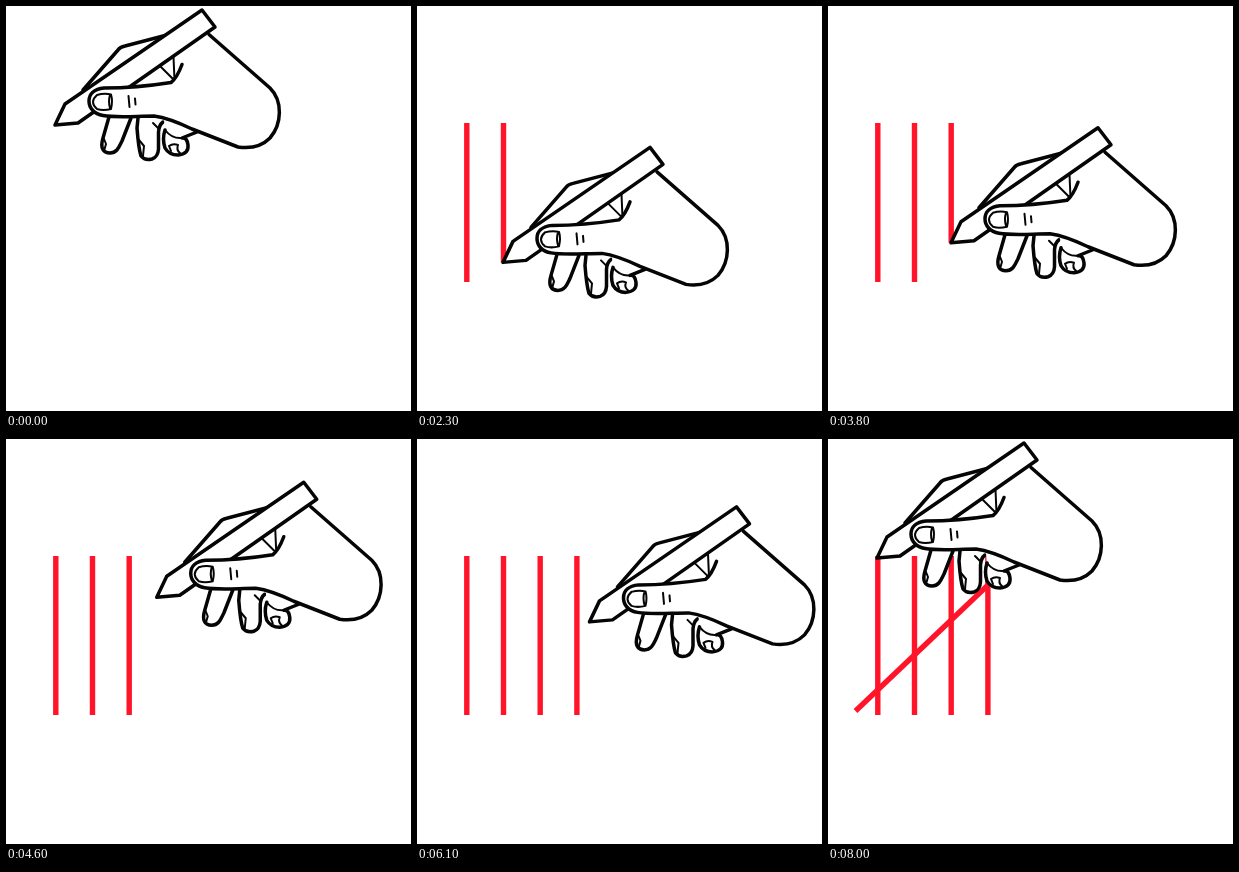
These frames come from a looping animation (405 px wide and 405 px high, 8.2 s). An HTML page:

```html
<!DOCTYPE html>
<html lang="en">
<head>
<meta charset="utf-8">
<title>Tally marks</title>
<style>
  html, body { margin: 0; height: 100%; overflow: hidden; background: #fff; }
  svg { display: block; width: 100%; height: 100%; }
  #marks { stroke: #ff1429; stroke-width: 5.4; }
  #hand { fill: #fff; stroke: #050505; stroke-width: 3.5; stroke-linejoin: round; stroke-linecap: round; }
  #hand .thin { fill: none; stroke-width: 2; }
  #hand .skin { stroke: none; }
</style>
</head>
<body>
<svg viewBox="0 0 405 405">
  <g id="marks"></g>
  <g id="hand">
    <!-- curled fingers -->
    <path d="M103 111L97 132C94 142 97 147 104 147C111 147 113 141 116 135L125 112"/>
    <path d="M132 112L131 122C132 135 133 144 135 150Q139 155 146 153Q152 151 152.500 143L152.500 126Q153 119 157 116"/>
    <path class="skin" d="M158 112L159 128L177 134L192 125L186 116Z"/>
    <path d="M159 124C157 130 157 136 159 142Q163 149 172 149Q183 148 182 139Q181 131 176 132L191 126"/>
    <path class="thin" d="M98 133L100 138L98 145M133 134L138 140L137 150M147 117L152 122M163 140Q167 137 172 139Q170 144 174 147M163 140L165 145M159 124Q166 133 176 132"/>
    <!-- index finger and the gap under the pen -->
    <path d="M77 84L112 44Q114 41 119 40L161 29"/>
    <path class="skin" d="M110 88L205 24L176 60L165 80Z"/>
    <path class="thin" d="M154 60L168 74M167.500 51L168.500 74"/>
    <!-- pen -->
    <path d="M196 4L209 21L72 117L49 119L59 98Z"/>
    <!-- palm and thumb -->
    <path d="M203 28.500L264 82C277 95 276 118 264 132Q252 144 232 141L186 123Q163 112 148 110C130 110 112 112 97 109.500C88 108 83 102 83 95C83 88 88 83 98 82C122 82 143 80 165 76.500Q171 72 176 58.500"/>
    <path class="thin" d="M91 89Q98 87 105 88.500Q107 95 105 103Q97 105 91 103Q83 96 91 89M104 89Q102 95 104 102M122.500 90L123.500 101M129 92.500L129.500 98.500"/>
  </g>
</svg>
<script>
  const LEG = 800, STEP = 100, LOOP = 8200;
  const HOME = [49, 119];

  // Pen tip stops: even legs draw, odd legs travel to the next mark.
  const stops = [];
  for (let i = 0; i < 4; i++) {
    const x = HOME[0] + 37 * i;
    stops.push([x, HOME[1]], [x, 276]);
  }
  stops.push([180, 127], [27.5, 272], HOME);

  const hand = document.getElementById("hand");
  const marks = document.getElementById("marks");
  const lines = Array.from({ length: 5 }, () =>
    marks.appendChild(document.createElementNS("http://www.w3.org/2000/svg", "line")));

  function tipAt(time) {
    const leg = Math.min(Math.floor(time / LEG), stops.length - 2);
    const part = Math.min(time / LEG - leg, 1);
    return stops[leg].map((v, k) => v + (stops[leg + 1][k] - v) * part);
  }

  function setLine(line, [x1, y1], [x2, y2]) {
    Object.entries({ x1, y1, x2, y2 }).forEach(([key, v]) => line.setAttribute(key, v));
  }

  function draw(now) {
    const time = Math.min(Math.floor((now % LOOP) / STEP) * STEP, LEG * 10);
    const tip = tipAt(time);
    hand.setAttribute("transform", `translate(${tip[0] - HOME[0]} ${tip[1] - HOME[1]})`);

    lines.forEach((line, i) => {
      const begin = i * 2 * LEG;
      line.style.display = time > begin ? "" : "none";
      const end = tipAt(Math.min(time, begin + LEG));
      if (i < 4) {
        const x = 49.8 + 36.7 * i;
        setLine(line, [x, 117], [x, end[1]]);
      } else {
        setLine(line, stops[i * 2], end);
      }
    });
  }

  const origin = performance.now();
  function tick() {
    draw(performance.now() - origin);
    requestAnimationFrame(tick);
  }
  tick();
</script>
</body>
</html>
```
